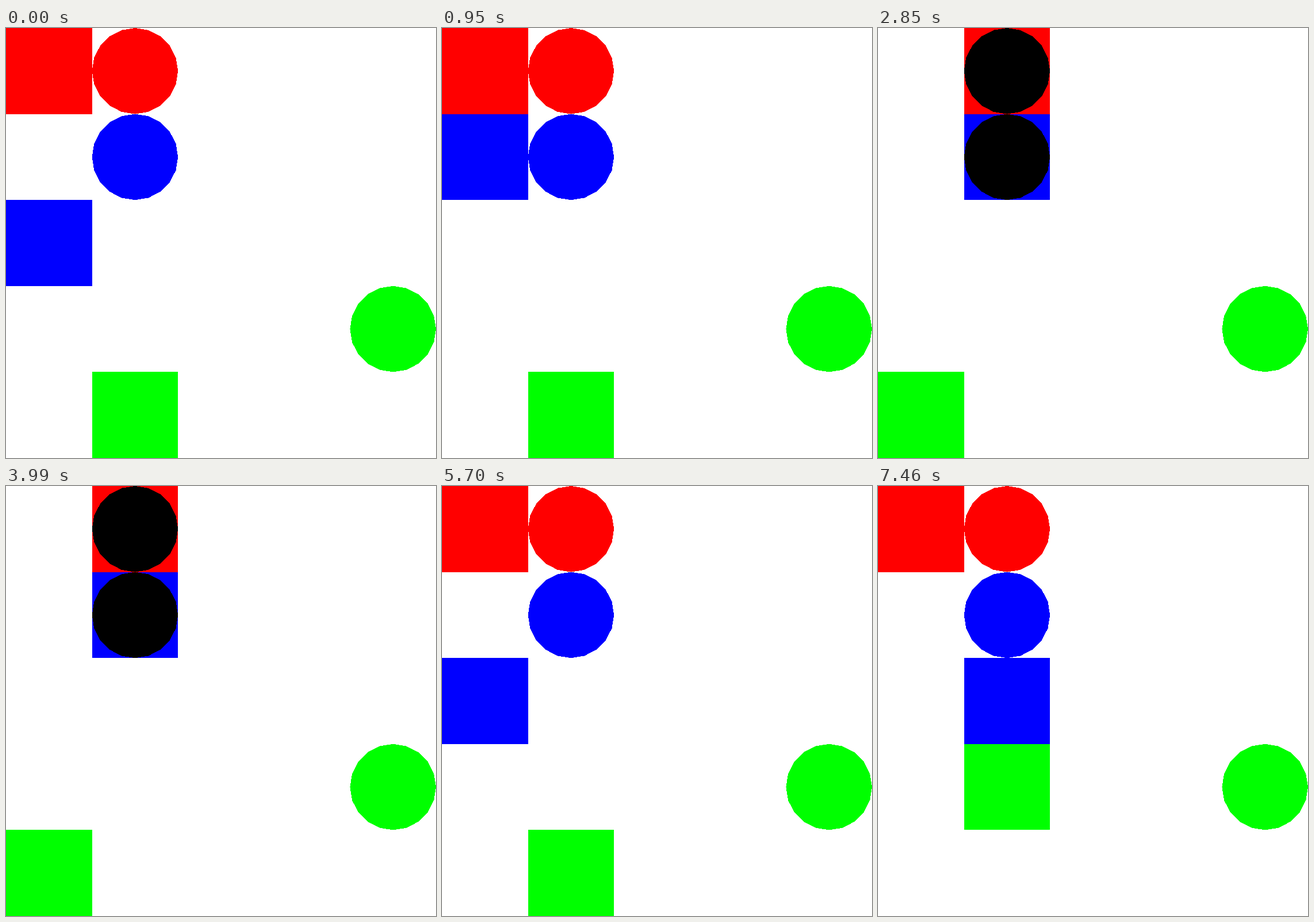
Animation, 748 px wide and 748 px high, one loop 8 s. Source, as an HTML page with a canvas:

```html
<!DOCTYPE html>
<html lang="en">
<head>
<meta charset="utf-8">
<title>Squares and goals</title>
<style>
  html, body { margin: 0; height: 100%; overflow: hidden; background: #fff; }
  canvas { display: block; width: 100vw; height: 100vh; image-rendering: pixelated; }
</style>
</head>
<body>
<canvas width="748" height="748"></canvas>
<script>
const SIZE = 748;
const CELL = SIZE / 5;
const RADIUS = CELL / 2;
const LOOP = 8000;
const BEAT = 950;
const STEP = 2 * Math.PI / 20; // discs are regular 20-gons
const ctx = document.querySelector('canvas').getContext('2d');

// One letter per beat: up, down, left, right, or a dot to wait.
const DIRECTIONS = { U: [0, -1], D: [0, 1], L: [-1, 0], R: [1, 0], '.': [0, 0] };
const players = [
  { color: '#f00', start: [0, 0], goal: [1, 0], moves: '.R...L.' },
  { color: '#00f', start: [0, 2], goal: [1, 1], moves: 'U.R.DLR' },
  { color: '#0f0', start: [1, 4], goal: [4, 3], moves: '.L..R.U' }
];

function cellAt({ start, moves }, beat) {
  let [column, row] = start;
  for (const move of moves.slice(0, beat)) {
    column += DIRECTIONS[move][0];
    row += DIRECTIONS[move][1];
  }
  return [column, row];
}

// Whole-pixel edges keep every shape free of antialiasing.
function fillBox(left, top, right, bottom) {
  const [x, y] = [Math.round(left), Math.round(top)];
  ctx.fillRect(x, y, Math.round(right) - x, Math.round(bottom) - y);
}

function drawSquare([column, row]) {
  fillBox(column * CELL, row * CELL, (column + 1) * CELL, (row + 1) * CELL);
}

function drawDisc([column, row]) {
  const centerX = (column + 0.5) * CELL;
  const centerY = (row + 0.5) * CELL;
  const apothem = RADIUS * Math.cos(STEP / 2);
  for (let y = Math.round(centerY - RADIUS); y < Math.round(centerY + RADIUS); y++) {
    const offset = Math.abs(y + 0.5 - centerY);
    const side = Math.floor(Math.asin(offset / RADIUS) / STEP);
    const normal = (side + 0.5) * STEP;
    const half = (apothem - offset * Math.sin(normal)) / Math.cos(normal);
    fillBox(centerX - half, y, centerX + half, y + 1);
  }
}

function draw(time) {
  const beat = Math.floor(time % LOOP / BEAT);
  ctx.fillStyle = '#fff';
  ctx.fillRect(0, 0, SIZE, SIZE);
  const cells = players.map(player => cellAt(player, beat));
  players.forEach(({ color }, i) => {
    ctx.fillStyle = color;
    drawSquare(cells[i]);
  });
  players.forEach(({ color, goal }, i) => {
    const reached = String(cells[i]) === String(goal);
    ctx.fillStyle = reached ? '#000' : color;
    drawDisc(goal);
  });
}

const began = performance.now();
function tick() {
  draw(performance.now() - began);
  requestAnimationFrame(tick);
}
tick();
</script>
</body>
</html>
```
